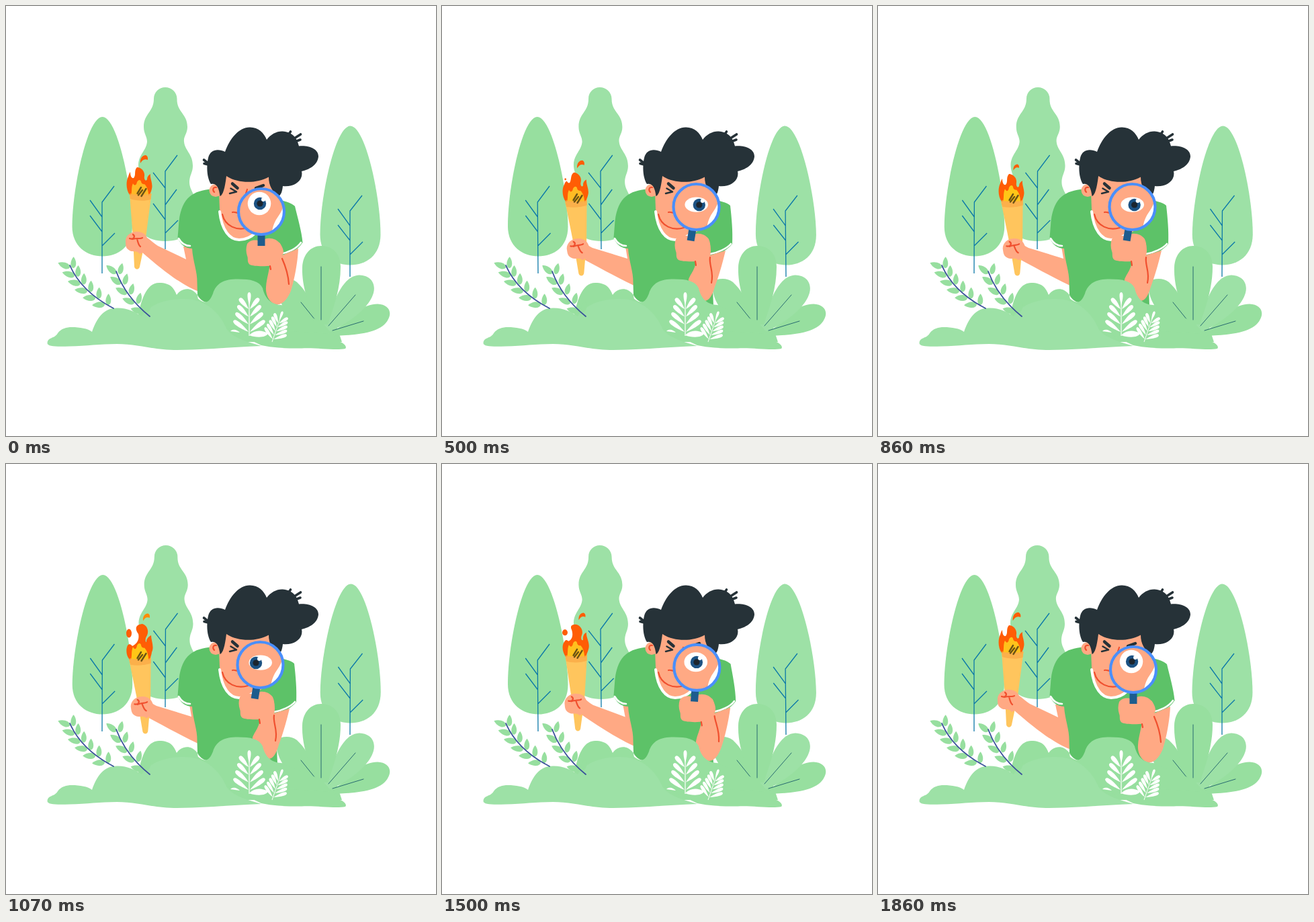
Animation, 640 px wide and 640 px high, one loop 1930 ms. Source, as an HTML page:

```html
<!DOCTYPE html>
<html lang="en">
<head>
<meta charset="utf-8">
<title>Explorer in the bushes</title>
<style>
  html, body { margin: 0; width: 100%; height: 100%; overflow: hidden; background: #fff; }
  svg { display: block; width: 100vw; height: 100vh; }
  .line { fill: none; stroke-linecap: round; stroke-linejoin: round; }
  .trunk { stroke: #0b78a8; stroke-width: 1.3; stroke-linecap: butt; }
  .vein { stroke: #286b70; stroke-width: 1; }
  .stem { stroke: #39509a; stroke-width: 1.8; }
  .hair { stroke: #263238; }
  .red { stroke: #f0502f; stroke-width: 2.2; }
  .white { stroke: #fff; }
  .skin { fill: #ffa984; }
  .shirt { fill: #5dc268; }
  .dark { fill: #97df9f; }
  .pale { fill: #9de1a6; }
  .fire { fill: #ff5d05; }
</style>
</head>
<body>
<svg viewBox="0 0 640 640">
  <g id="tree2">
    <path class="pale" d="M237 121C246 121 254.500 128 254.500 138C254 158 270 160 270 180C270 190 264 194 265 202C266 215 278 220 278 238C278 248 273 252 273 262C273 276 285 282 285 306C285 335 265 350 237 350C210 350 190 335 190 306C190 282 202 276 202 262C202 252 197 248 197 236C198 220 209 215 210 202C210 194 205 190 205 180C205 160 220 158 220 138C220 128 228 121 237 121Z"/>
    <path class="line trunk" d="M237 362V246L255 222M237 271L219 248M237 296L254 273M237 318L219 294M237 338L256 319"/>
  </g>
  <g id="tree1">
    <path class="dark" d="M143.500 165C166 165 188 272 188 328C188 358 167 372.500 143.500 372.500C120 372.500 98.500 358 98.500 328C98.500 272 121 165 143.500 165Z"/>
    <path class="line trunk" d="M143 398V292L161 268M143 314L125 289M143 336L125 312M143 357L162 338"/>
  </g>
  <g id="tree3">
    <path class="pale" d="M512.500 178.500C535 178.500 557.500 284 557.500 340C557.500 371 536 385.500 512.500 385.500C489 385.500 467.500 371 467.500 340C467.500 284 490 178.500 512.500 178.500Z"/>
    <path class="line trunk" d="M512 403V305L530 282M512 327L494 302M512 349L494 326M512 370L531 351"/>
  </g>

  <path class="dark" d="M195 470C200 440 208 412 228 412C245 412 250 420 254 430C260 421 274 416 285 430L290 470Z"/>
  <path class="dark" d="M402 411C410 405 424 404 433 411C445 422 450 433 456 445L490 470L500 500H411V445C405 435 402 425 402 411Z"/>
  <path class="dark" d="M474 490C505 482 515 445 553 443.500C569 444 575 455 569 466C560 486 525 490 486 491Z"/>
  <path class="pale" d="M470 480C486 455 495 402 526 400.500C541 401 551 411 547 427C540 452 505 474 484 484Z"/>
  <path class="dark" d="M460 474C452 445 440 420 441 389C442 369 454 357 469 357C487 357 498 370 498 388C498 420 488 447 479 474Z"/>
  <path class="line vein" d="M469 388V467M439 441L460 467M520 430L480 476M532 469L486 483"/>

  <path id="armL" class="skin"/>
  <path id="shirt" class="shirt"/>
  <path class="line white" stroke-width="2.600" d="M257 346C261 353 267 357 274 357"/>
  <path id="cuffR" class="line white" stroke-width="2.600"/>

  <path class="skin" d="M316 250L318 302C321 332 333 347 347 347C366 347 384 336 397 318C407 302 409 280 398 250Z"/>
  <path class="line white" stroke-width="4" d="M318 306C321 334 333 348 347 348C358 348 366 343 372 337"/>
  <circle class="skin" cx="312" cy="274.500" r="9.500"/>
  <path class="line red" d="M313 270C308 269 307 274 310 277"/>
  <path class="line red" d="M322 310C326 328 344 335 360 330M337 307C340 306 343 308 346 308M359 273L357 279"/>
  <path class="line hair" stroke-width="4.500" d="M337 264.500L344.500 271M372 271L383 267"/>
  <path class="line hair" stroke-width="2.500" d="M334.500 271.500L343 276.500L333 279"/>
  <path fill="#263238" d="M305 265C299 256 298 239 301 226C304 213 316 212 326 217C333 198 346 180.500 363 180.500C376 180.500 384 189 388 199C396 188 410 183 422 189C431 193 434 201 436 208.500C450 207 465 212 465 224C464 237 450 244 440 246C443 259 430 270 412 268C411 277 409 281 406 283C397 277 391 268 391 254.500C372 265 344 264 328 253C326 270 323 282 318.500 283C317 270 313 263 305 265Z"/>
  <path class="line hair" stroke-width="3.600" d="M294.500 229L302 235M295 234.500L301 236M418 195L423.500 187M426 199L438.500 191M430 202L438 199"/>

  <path id="armR" class="skin"/>
  <path id="fist" class="skin" d="M359 354C364 347 372 348 380 350C388 343 402 345 408 354C412 362 411 374 405 382C398 389 370 388 363 385C358 381 361 376 359 372C357 366 357 360 359 354Z"/>
  <path id="crease" class="line red"/>

  <g id="lens">
    <rect id="handle" x="-5.500" y="35" width="11" height="16" fill="#1d5c8d"/>
    <circle class="skin" r="34"/>
    <path fill="#fff" d="M33 -10C30 6 19 9 16 30C28 24 36 8 33 -10Z"/>
    <circle r="34" fill="none" stroke="#4a8ffb" stroke-width="4.200"/>
  </g>
  <ellipse id="eye" fill="#fff"/>
  <g id="iris">
    <circle r="9.200" fill="#1c5283"/>
    <circle r="4.600" fill="#1c252e"/>
    <circle cx="5" cy="-6" r="3" fill="#fff"/>
  </g>

  <path class="dark" d="M285 435C297 445 303 441 308 428C313 412 325 406.500 345 406.500C364 406.500 377 409 382 420C385 433 392 444 410 445L470 470L495 500H290Z"/>
  <path class="dark" d="M327 480L400 482L486 488C493 492 490 498 500 501C506 505 507 508 505 510C490 513 460 508 440 509.500C420 510 400 509 380 505Z"/>
  <path class="pale" d="M61.500 502C62 492 72 496 77 487C82 480 90 478 98 478C110 478 122 480 128 485C135 465 145 449.500 165 449.500C180 449 192 455 202 462C212 448 230 436 265 436C300 436 320 460 329 482C340 495 360 500 380 506C340 507 300 512 250 512C215 511 195 503 165 503C140 503 120 506 95 506.500C75 507 62 507 61.500 502Z"/>
  <g id="ferns" fill="#fff"></g>
  <path fill="#fff" d="M334 484C338 480 344 482 348 486ZM362 490C370 482 380 482 390 487C388 494 372 494 362 490Z"/>
  <g id="twigs" class="dark"></g>

  <g id="torch">
    <path fill="#ffc55d" d="M184 280H216.500L208 345L199 388C198 393 192 393 191 388L189 345Z"/>
    <path fill="#fbb04b" d="M184 279H216.500L215.300 288C206 291 194 290 185 287Z"/>
    <path class="skin" d="M178 352C177 343 184 337 192 336C202 335 210 340 211 349C212 358 208 366 199 369C195 363 188 367 184 364C179 361 178 358 178 352Z"/>
    <path class="line red" d="M184 346C190 348 193 343 189 340M188 347C194 345 201 347 203 345M195 346C196 351 197 356 200 358"/>
  </g>
  <g id="flame">
    <path id="blaze" class="fire"/>
    <path id="spark" d="M200 234C199 227 203 222 208 222C212 224 211 228 211 229C206 227 203 229 200 234Z"/>
    <ellipse id="ember" class="fire"/>
    <path id="core" d="M186 281C188 275 186 269 189 263C191 267 194 267 195 261C197 257 200 257 201 260C201 263 204 265 206 264C210 268 212 274 212 282Z"/>
    <path fill="#fbb04b" opacity=".75" d="M184 279C194 281 206 281 216 279L215.500 287C205 290 195 289 185 286Z"/>
    <path class="line" stroke="#6b5316" stroke-width="2.400" d="M195.500 279L201 270M197 281.500L203 274M201.500 283L208.500 272"/>
  </g>
</svg>
<script>
const LOOP = 1930, FPS = 14, FRAMES = 27;
const $ = id => document.getElementById(id);
const set = (id, attrs) => { for (const a in attrs) $(id).setAttribute(a, attrs[a]); };
const lerp = (a, b, p) => a + (b - a) * p;
const ease = (k, from, to) => {
  const x = Math.min(1, Math.max(0, (k - from) / (to - from)));
  return x * x * (3 - 2 * x);
};

// Blends two paths that share the same commands
const NUM = /-?\d+(\.\d+)?/g;
function mix(a, b, p) {
  const target = b.match(NUM);
  let i = 0;
  return a.replace(NUM, n => lerp(+n, +target[i++], p).toFixed(2));
}

// Samples rows of [time, value, value, ...]
function sample(rows, k, smooth) {
  let i = 0;
  while (i < rows.length - 2 && k >= rows[i + 1][0]) i++;
  const [a, b] = [rows[i], rows[i + 1]];
  const x = (k - a[0]) / (b[0] - a[0]);
  const p = smooth ? ease(x, 0, 1) : x;
  return a.slice(1).map((v, j) => typeof v === 'string' ? mix(v, b[j + 1], p) : lerp(v, b[j + 1], p));
}

const placed = (x, y, deg, d) => `<path transform="translate(${x} ${y}) rotate(${deg})" d="${d}"/>`;
// Pointed leaf, widest near its base
const leaf = (x, y, deg, l, w) =>
  placed(x, y, deg, `M0 0C${l * .1} ${-w * 1.3} ${l * .7} ${-w} ${l} 0C${l * .7} ${w} ${l * .1} ${w * 1.3} 0 0Z`);
// Rounded frond, widest near its tip
const frond = (x, y, deg, l, w) =>
  placed(x, y, deg, `M0 0C${l * .5} ${-w} ${l} ${-w * 1.4} ${l} 0C${l} ${w * 1.4} ${l * .5} ${w} 0 0Z`);

function fern(x, y, deg, scale, pairs) {
  let out = frond(0, -46, -90, 19, 2.8);
  for (let i = 0; i < pairs; i++) {
    const h = i / (pairs - 1);
    for (const side of [-1, 1]) {
      out += frond(side, -6 - 34 * h, -90 + side * (53 - 13 * h), 28 - 7 * h, 3.6);
    }
  }
  out += '<path d="M-.6 0V-52H.6V0Z"/>';
  return `<g transform="translate(${x} ${y}) rotate(${deg}) scale(${scale})">${out}</g>`;
}

function twig(p0, p1, p2, count, tilt) {
  const at = (t, j) => (1 - t) ** 2 * p0[j] + 2 * t * (1 - t) * p1[j] + t * t * p2[j];
  let out = '';
  for (let i = 0; i < count; i++) {
    const t = .03 + i * .84 / (count - 1), x = at(t, 0), y = at(t, 1);
    out += leaf(x - 1, y + 1, 203 + tilt - 30 * t, 19, 5.2);
    out += leaf(x + 4, y + 2, -88 + tilt * .7, 17, 4.6);
  }
  return out + `<path class="line stem" d="M${p0}Q${p1} ${p2}"/>`;
}

$('ferns').innerHTML = fern(362, 491, 0, 1, 4) + fern(396, 500, 19, .74, 5);
$('twigs').innerHTML = twig([95, 386], [112, 425], [160, 450], 6, 0) +
  twig([164, 395], [178, 433], [214, 462], 5, 18);

const ARM_L = [
  'M205 343C213 345 218 352 226 357L268 377L264 358L290 358L290 426C265 418 235 395 203 367Z',
  'M212 350C216 355 219 358 224 360L276 376L273 358L292 358L292 419C268 408 237 391 209 376Z'];
const ARM_R = [
  'M407 352C414 362 414 368 411 371L435 361C434 385 428 412 424 424C420 434 412 446 402 444C392 442 386 430 387 418C388 404 392 396 393 380Z',
  'M396 346C400 356 401 364 399 371L422 364C417 385 411 405 406 418C402 432 397 440 388 439C378 436 366 420 367 407C370 398 378 392 378 376Z'];
const CREASE = [
  'M411 376C415 385 420 398 421 414M393 387L394 392',
  'M399 374C397 386 405 395 401 412M377 380L378 386'];
const CUFF = ['M408 369C420 367 433 361 439 352', 'M399 369C411 367 424 361 430 354'];
const BACK = 'M306 272.500C279 275 262 284 257.500 320L255.500 345C260 356 268 361 277 361C278 380 285 395 284.500 412L285 430C290 440 298 442 305 441L404 446L401 372';
const SHIRT = [
  BACK + 'C420 371 433 365 441.500 352C440 335 434 315 430 298C424 292 412 290 405 288Z',
  BACK + 'C413 370 425 363 432 354C433 335 431 315 429 297C424 292 412 290 405 288Z'];

const CALM = 'M184 281C179 274 178 262 182 254C183 250 184 248 185 247C185 253 187 257 190 256C194 252 190 245 195 240C200 240 207 245 206 253C205 258 208 262 210 258C210 254 212 252 215 250C214 257 219 264 217 272C216 277 214 280 213 282Z';
const LICK = 'M184 281C179 274 178 264 182 259C184 255 186 256 188 258C193 256 196 250 193 241C190 235 194 233 199 233C206 234 211 242 208 249C206 254 208 258 210 256C209 250 212 246 215 245C214 252 221 261 218 270C216 277 214 280 213 282Z';
const RISE = 'M184 281C179 276 178 266 181 260C183 257 186 258 188 261C194 258 199 252 197 243C190 233 195 229 203 228C210 230 213 238 210 245C206 251 208 256 209 255C209 250 212 247 216 245C216 253 221 262 217 270C216 277 214 280 213 282Z';
const BURST = 'M184 282C178 275 175 264 180 257C182 254 185 256 186 260C189 254 193 250 195 253C200 250 195 246 194 239C193 229 209 227 210 238C210 245 202 246 205 254C207 248 211 246 215 247C215 257 221 264 217 273C216 277 214 280 213 282Z';

// phase, outline, spark x, y, size, green level, ember x, y, rx, ry
const FLAME = [
  [0, CALM, 205.5, 228, 1, 93, 184, 249, 0, 0],
  [.75, LICK, 208.5, 221, .9, 93, 183, 245, 4, 4.5],
  [1.5, RISE, 209, 218, .9, 140, 183, 242, 4, 6.5],
  [3, BURST, 212, 214, .5, 93, 184.5, 234, 2, 4.5],
  [4.4, BURST, 213, 209, 0, 93, 185, 228, 0, 0],
  [4.8, CALM, 205, 233, .5, 93, 184, 249, 0, 0],
  [5.75, CALM, 206.5, 227, 1.05, 93, 184, 249, 0, 0],
  [6.75, CALM, 205.5, 228, 1, 93, 184, 249, 0, 0]];
const GAZE = [[0, 378], [3, 379], [5, 379.4], [8.5, 385], [11, 385], [14, 372], [16, 372], [19.5, 379], [27, 378]];
const SWAY = [[0, 0], [6, -2.3], [13.5, 1.4], [20, -2.2], [27, .1]];
// id, foot, height, amount
const TREES = [['tree1', 398, 233, .8], ['tree2', 362, 241, 1], ['tree3', 403, 225, 1]];

function draw(k) {
  const left = ease(k, 0, 6) - ease(k, 17, 26);
  const right = ease(k, 0, 4.4) - ease(k, 17, 24.5);

  const [sway] = sample(SWAY, k, true);
  for (const [id, foot, height, amount] of TREES) {
    const skew = -sway * amount / height;
    set(id, { transform: `matrix(1 0 ${skew} 1 ${-skew * foot} 0)` });
  }

  set('armL', { d: mix(...ARM_L, left) });
  set('torch', { transform: `translate(${8 * left} ${10 * left}) rotate(${-7 * left} 195 352)` });

  set('shirt', { d: mix(...SHIRT, right) });
  set('cuffR', { d: mix(...CUFF, right) });
  set('armR', { d: mix(...ARM_R, right) });
  set('crease', { d: mix(...CREASE, right) });
  set('fist', { transform: `translate(${-11 * right} ${-7 * right})` });
  set('lens', { transform: `translate(${380 - 1.5 * right} ${306 - 7 * right})` });
  set('handle', { transform: `rotate(${9.5 * right})` });

  set('eye', { cx: 377 + 1.7 * right, cy: 294 + 1.6 * right, rx: 17.3, ry: 17.3 - 6.2 * right });
  set('iris', { transform: `translate(${sample(GAZE, k, true)[0]} ${294 + 2 * right})` });

  const phase = k % (FRAMES / 4);
  const [outline, sx, sy, size, green, ex, ey, rx, ry] = sample(FLAME, phase);
  const glow = Math.sin(Math.PI * phase / (FRAMES / 4));
  set('flame', { transform: `translate(0 ${10 * left})` });
  set('blaze', { d: outline });
  set('spark', {
    transform: `translate(${sx} ${sy}) scale(${size}) translate(-205.5 -228)`,
    fill: `rgb(255 ${Math.round(green)} 5)`
  });
  set('ember', { cx: ex, cy: ey, rx, ry });
  set('core', {
    fill: `rgb(255 ${Math.round(lerp(184, 206, glow))} ${Math.round(lerp(38, 14, glow))})`,
    transform: `translate(0 282) scale(1 ${lerp(.95, 1.08, glow)}) translate(0 -282)`
  });
}

const start = performance.now();
function tick() {
  const t = (performance.now() - start) % LOOP;
  draw(Math.floor((Math.floor(t / 10) * 10 + 5) * FPS / 1000));
  requestAnimationFrame(tick);
}
tick();
</script>
</body>
</html>
```
